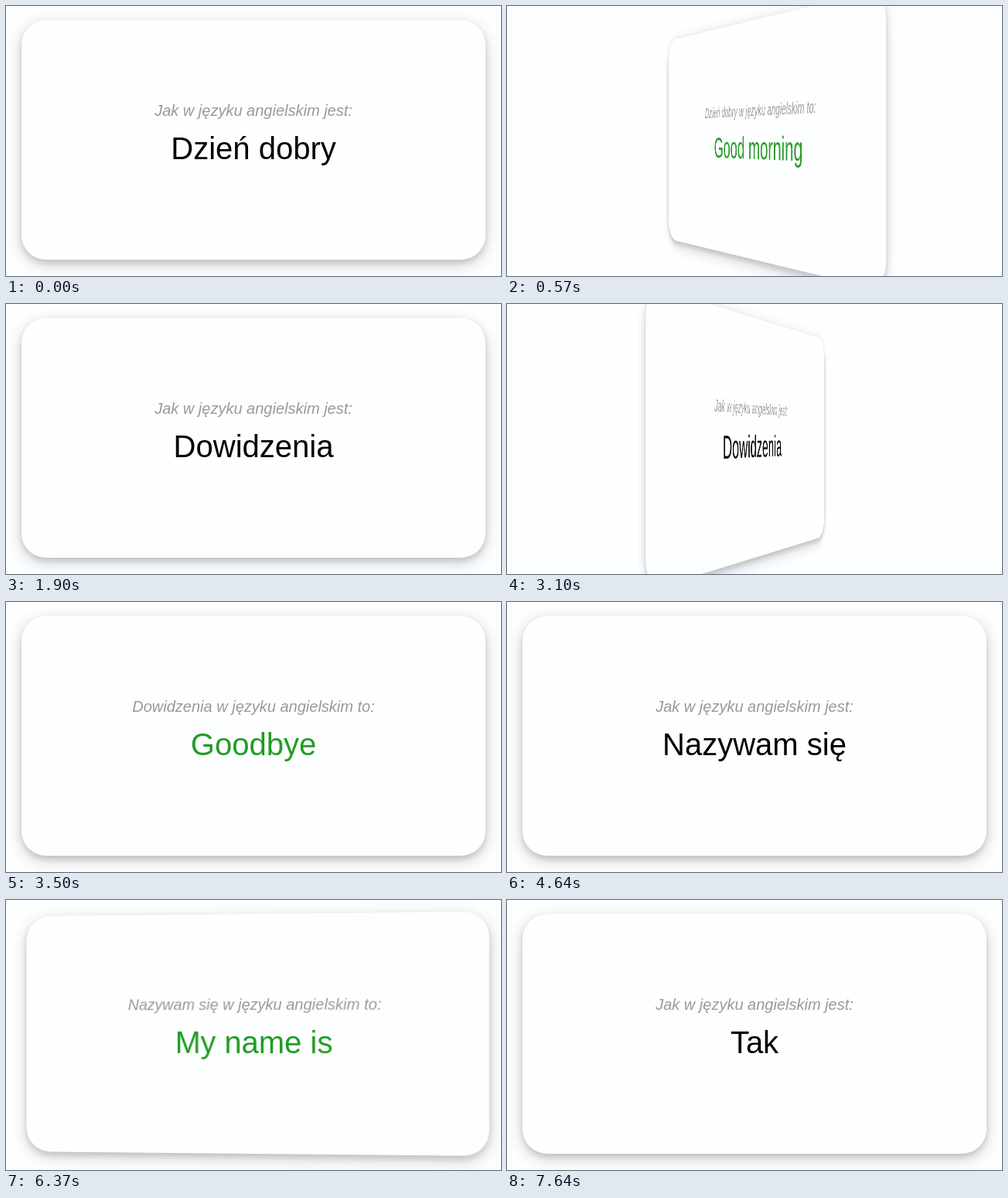
Write an HTML page that moves like this. It is 640 by 349 pixels and loops after 8 s.

```html
<!DOCTYPE html>
<html lang="pl">
<head>
<meta charset="utf-8">
<title>Fiszki</title>
<style>
  html, body { margin: 0; width: 100%; height: 100%; overflow: hidden; background: #fdfeff; }
  #stage { position: fixed; inset: 0; overflow: hidden; contain: strict; }
  #scene { position: absolute; left: 20px; top: 18px; width: 600px; height: 310px; perspective: 1280px; }
  #card { position: absolute; inset: 0; transform-style: preserve-3d; }
  .face {
    position: absolute; inset: 0; border-radius: 32px; background: #fdfeff;
    box-shadow: 0 4px 8px rgba(0, 0, 0, .13), 0 6px 20px rgba(0, 0, 0, .19);
    backface-visibility: hidden; text-align: center; white-space: nowrap;
    font-family: "Liberation Sans", Arial, sans-serif;
  }
  .back { transform: rotateY(180deg); }
  .hint, .word { position: absolute; left: 0; right: 0; }
  .hint { top: 105px; font-size: 20px; line-height: 24px; font-style: italic; color: #999; }
  .word { top: 142px; font-size: 40px; line-height: 48px; color: #000; }
  .back .word { color: #1f9d23; }
</style>
</head>
<body>
<div id="stage">
  <div id="scene">
    <div id="card">
      <div class="face front"><div class="hint">Jak w języku angielskim jest:</div><div class="word"></div></div>
      <div class="face back"><div class="hint"></div><div class="word"></div></div>
    </div>
  </div>
</div>
<script>
const LOOP = 8000, STEP = 66.6, FLIP = 478, LEAD = 113.5;
const cards = [
  { pl: 'Dzień dobry', en: 'Good morning', flip: 500, next: 1840 },
  { pl: 'Dowidzenia', en: 'Goodbye', flip: 3100, next: 4570 },
  { pl: 'Nazywam się', en: 'My name is', flip: 6100, next: 7570 },
  { pl: 'Tak', en: 'Yes', flip: LOOP, next: LOOP }
];
const find = s => document.querySelector(s);
const card = find('#card'), front = find('.front .word');
const hint = find('.back .hint'), back = find('.back .word');

// The CSS "ease" curve, solved by bisection
function ease(x) {
  if (x >= 1) return 1;
  let lo = 0, hi = 1, u;
  for (let i = 0; i < 30; i++) {
    u = (lo + hi) / 2;
    if (.75 * u * (1 - u) + u ** 3 < x) lo = u; else hi = u;
  }
  return .3 * u * (1 - u) ** 2 + 3 * u * u * (1 - u) + u ** 3;
}

// The flip runs at 15 steps a second and is already under way at its first step
function angle(since) {
  if (since < 0) return 0;
  return 180 * ease((Math.floor(since / STEP) * STEP + LEAD) / FLIP);
}

let shown;
function draw(now) {
  const t = now % LOOP;
  const c = cards.find(c => t < c.next);
  if (c !== shown) {
    shown = c;
    front.textContent = c.pl;
    hint.textContent = c.pl + ' w języku angielskim to:';
    back.textContent = c.en;
  }
  card.style.transform = `rotateY(${angle(t - c.flip)}deg)`;
}

const start = performance.now();
function tick() {
  draw(performance.now() - start);
  requestAnimationFrame(tick);
}
tick();
</script>
</body>
</html>
```
